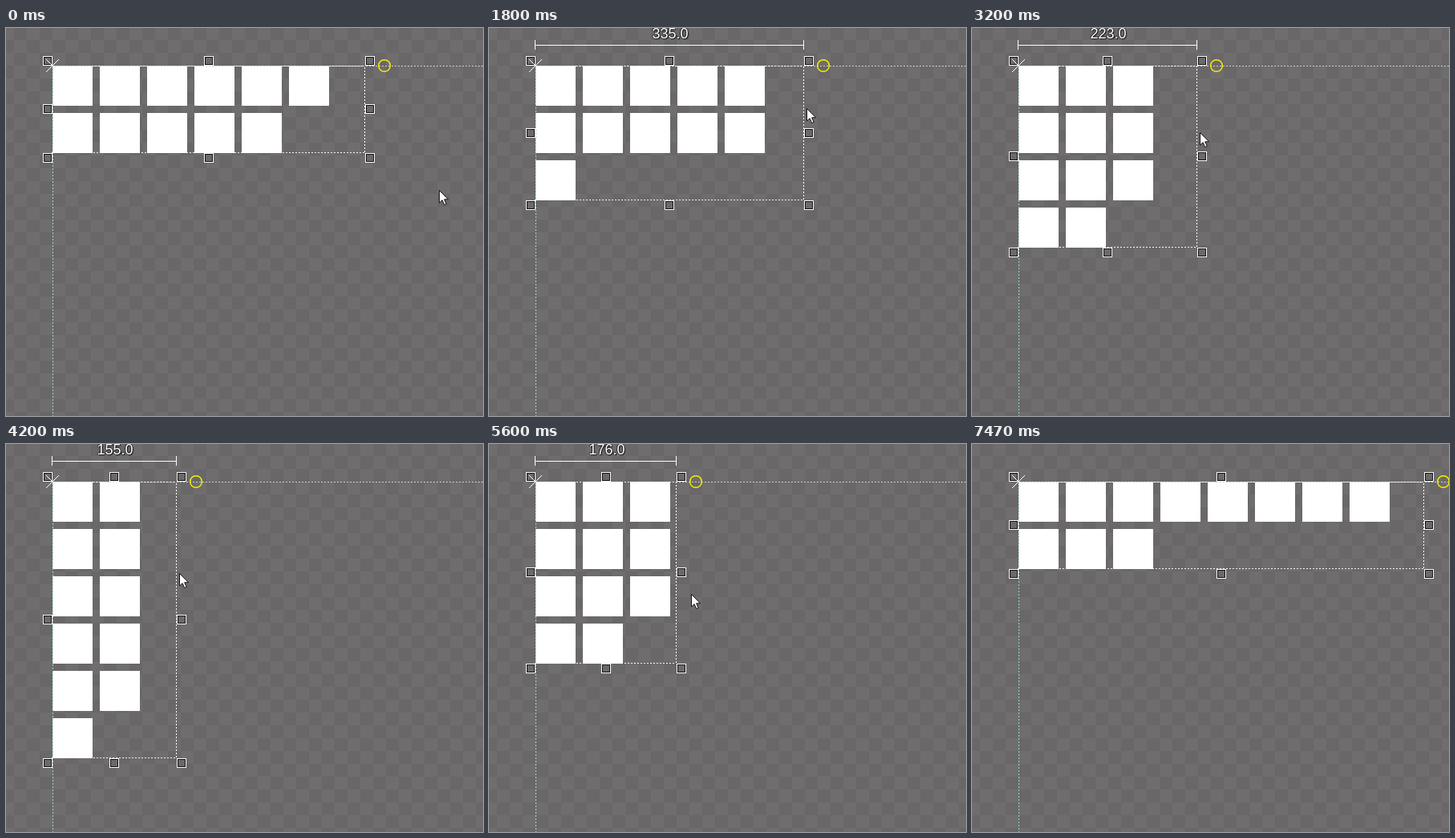
Animation, 595 px wide and 484 px high, one loop 8000 ms. Source, as an HTML page with a canvas:

```html
<!DOCTYPE html>
<html lang="en">
<head>
<meta charset="utf-8">
<title>Wrapping boxes</title>
<style>
  html, body { margin: 0; width: 100%; height: 100%; overflow: hidden; background: #6c6a6b; }
  canvas { position: absolute; left: 0; top: 0; }
  #label {
    position: absolute; left: 0; top: -3px; width: 80px; margin-left: -40px;
    font: 18px/21px "Liberation Sans", Arial, sans-serif;
    text-align: center; color: #fff;
    text-shadow: 1px 1px 1px #111, -1px 0 1px #222, 0 -1px 1px #222;
  }
</style>
</head>
<body>
<canvas id="stage" width="595" height="484"></canvas>
<div id="label"></div>
<script>
const W = 595, H = 484, LOOP = 8000, STEPS = 120;
const LEFT = 57, TOP = 47, SIZE = 50, PITCH = 59, COUNT = 11;
const PRESS = 12, RELEASE = 105;
const DASH = [2, 2];

// step, box width, pointer height
const KEYS = [
  [0, 390, 101], [15, 390, 101], [27, 335, 101], [48, 223, 131],
  [63, 155, 162], [76, 100, 187], [80, 100, 187], [84, 176, 188],
  [94, 404, 107], [98, 528, 99], [102, 506, 101], [STEPS, 506, 101]
];

const ctx = document.getElementById("stage").getContext("2d");
const label = document.getElementById("label");

function mix(step, n) {
  const i = KEYS.findIndex(k => k[0] > step);
  const a = KEYS[i - 1], b = KEYS[i];
  return a[n] + (b[n] - a[n]) * (step - a[0]) / (b[0] - a[0]);
}

// The box trails the pointer in proportion to its speed.
function pose(step) {
  const w = mix(step, 1);
  const speed = w - mix(Math.max(0, step - 1), 1);
  const p = Math.min(1, step / 11);
  const away = 1 - p * p * (3 - 2 * p);
  const fall = Math.max(0, step - RELEASE + 1);
  return {
    w: Math.round(w),
    x: Math.round(LEFT + w + 8 + speed * 0.62 + 86 * away),
    y: Math.round(mix(step, 2) + 102 * away + 7.35 * fall * fall)
  };
}

function makeBoard() {
  const board = document.createElement("canvas");
  board.width = W;
  board.height = H;
  const c = board.getContext("2d");
  c.fillStyle = "#696768";
  c.fillRect(0, 0, W, H);
  c.fillStyle = "#6f6d6e";
  for (let r = 0; r < 31; r++)
    for (let q = r % 2; q < 38; q += 2)
      c.fillRect(q * 16 - 6, r * 16 - 1, 16, 16);
  return board;
}
const board = makeBoard();

function line(x1, y1, x2, y2, color, dash = [], offset = 0) {
  ctx.strokeStyle = color;
  ctx.lineWidth = 1;
  ctx.setLineDash(dash);
  ctx.lineDashOffset = offset;
  ctx.beginPath();
  ctx.moveTo(x1, y1);
  ctx.lineTo(x2, y2);
  ctx.stroke();
}

function handle(x, y) {
  [["#fff", 6], ["#111", 5], ["#6b696a", 4]].forEach(([color, r]) => {
    ctx.fillStyle = color;
    ctx.fillRect(x - r, y - r, r * 2, r * 2);
  });
}

function pointer(x, y) {
  ctx.setLineDash([]);
  ctx.beginPath();
  [[0, 0], [0, 15.5], [3.6, 12.2], [6.2, 18], [8.7, 17], [6.2, 11.3], [11, 11.3]]
    .forEach(([dx, dy]) => ctx.lineTo(x + dx - 0.5, y + dy - 0.5));
  ctx.closePath();
  ctx.fillStyle = "#fff";
  ctx.fill();
  ctx.strokeStyle = "#111";
  ctx.lineWidth = 1;
  ctx.stroke();
}

function draw(step) {
  const { w, x: px, y: py } = pose(step);
  const cols = Math.max(1, Math.floor((w + PITCH - SIZE) / PITCH));
  const rows = Math.ceil(COUNT / cols);
  const right = LEFT + w;
  const bottom = TOP + rows * PITCH - 10;

  ctx.drawImage(board, 0, 0);
  ctx.fillStyle = "#fff";
  for (let i = 0; i < COUNT; i++)
    ctx.fillRect(LEFT + 1 + (i % cols) * PITCH, TOP + Math.floor(i / cols) * PITCH, SIZE, SIZE);

  // guides
  line(LEFT, TOP + 0.5, W, TOP + 0.5, "#cdd2d4", DASH);
  line(LEFT + 1.5, TOP, LEFT + 1.5, H, "#9fd6da", DASH);

  // box outline
  line(right, TOP + 0.5, LEFT, TOP + 0.5, "#fff", DASH, 2);
  line(LEFT, bottom + 0.5, right, bottom + 0.5, "#fff", DASH);
  line(right + 0.5, bottom, right + 0.5, TOP, "#fff", DASH);

  const hx = [52, Math.floor(w / 2) + 58, right + 7];
  const hy = [41, Math.floor((48 + bottom) / 2), bottom + 7];
  hx.forEach((x, i) => hy.forEach((y, j) => {
    if (i !== 1 || j !== 1) handle(x, y);
  }));

  // origin cross
  line(50, 39, 66, 55, "#fff");
  line(50, 55, 66, 39, "#fff");

  ctx.strokeStyle = "#f4f000";
  ctx.lineWidth = 1.5;
  ctx.setLineDash([]);
  ctx.beginPath();
  ctx.arc(right + 25, TOP, 7.3, 0, Math.PI * 2);
  ctx.stroke();

  const held = step >= PRESS && step < RELEASE;
  label.style.display = held ? "block" : "none";
  if (held) {
    line(LEFT, 21.5, right + 1, 21.5, "#fff");
    [LEFT, right].forEach(x => line(x + 0.5, 15, x + 0.5, 27, "#fff"));
    label.textContent = w.toFixed(1);
    label.style.left = LEFT + 2 + Math.floor(w / 2) + "px";
  }
  pointer(px, py);
}

const start = performance.now();
function tick() {
  const t = (performance.now() - start) % LOOP;
  draw(Math.min(STEPS - 1, Math.floor((t + 4) * STEPS / LOOP)));
  requestAnimationFrame(tick);
}
tick();
</script>
</body>
</html>
```
